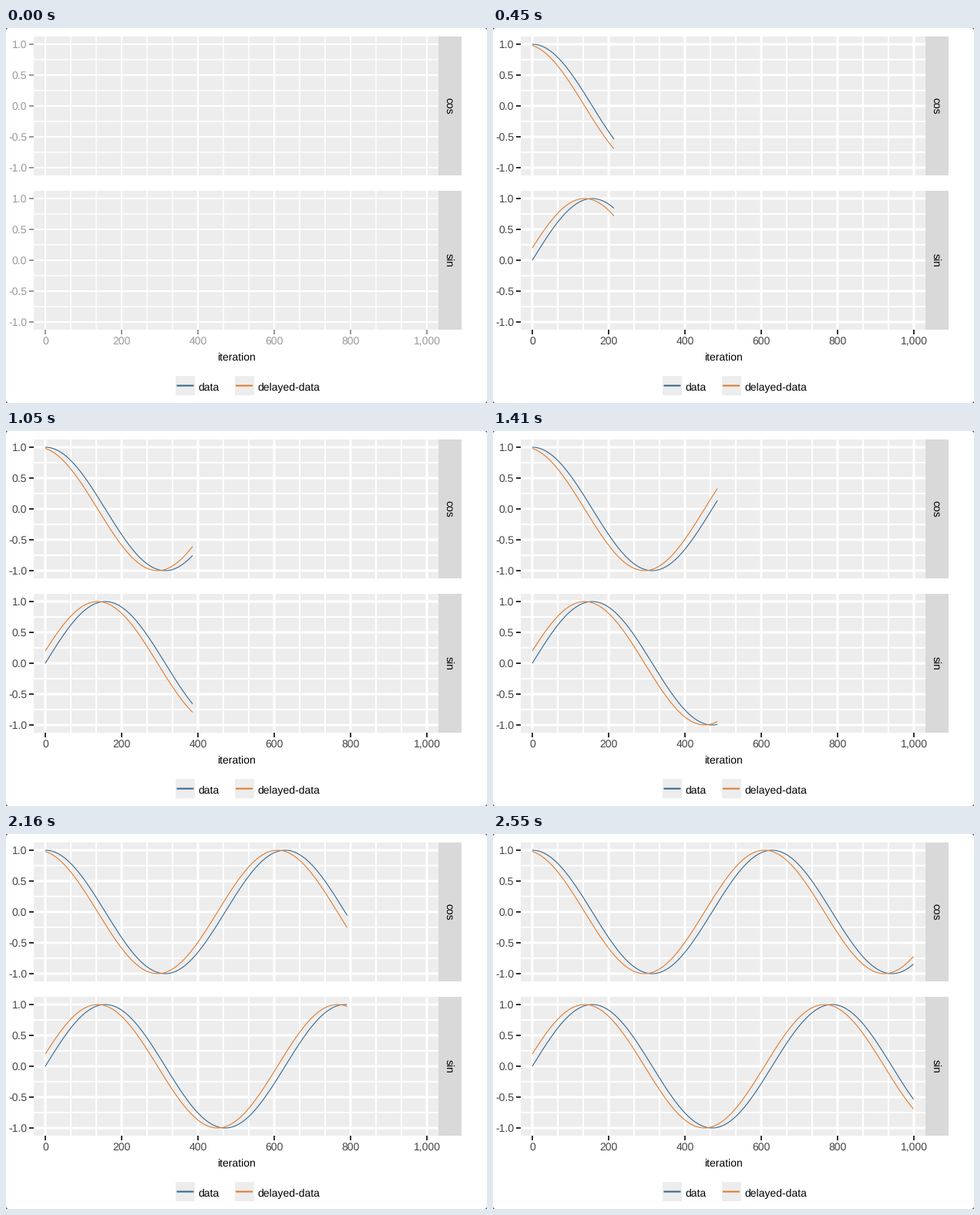
These frames come from a looping animation (624 px wide and 486 px high, 2.88 s). A matplotlib script:

```python
import matplotlib.pyplot as plt
import numpy as np
from matplotlib.animation import FuncAnimation
from matplotlib.patches import Polygon, Rectangle

plt.rcParams["font.family"] = "Liberation Sans"
plt.rcParams["text.hinting"] = "none"

W, H, DPI = 624, 486, 96
PX = 72 / DPI  # points per pixel
FRAMES, INTERVAL = 96, 30

BLUE, ORANGE = "#33658c", "#dd7a2c"
PANEL, STRIP = "#ededed", "#d9d9d9"
LEFT, RIGHT, X0, X_SCALE = 36, 561, 51, 0.495
HALF, AMP = 90, 80
PANELS = [(np.cos, "cos", 101), (np.sin, "sin", 301)]

# Iterations received so far; the stream arrives at an uneven pace.
SLOTS = [0, 6, 23, 34, 36, 54, 55, 58, 71, 73, 84]
COUNTS = [0, 146, 290, 386, 406, 549, 549, 591, 791, 810, 999]

fig = plt.figure(figsize=(W / DPI, H / DPI), dpi=DPI, facecolor="white")
ax = fig.add_axes([0, 0, 1, 1])
ax.set_xlim(0, W)
ax.set_ylim(H, 0)
ax.axis("off")


def box(x, y, w, h, color):
    ax.add_patch(Rectangle((x, y), w, h, fc=color, lw=0, zorder=1))


def line(x, y, color, width, z):
    return ax.plot(x, y, color=color, lw=width * PX, zorder=z,
                   solid_capstyle="butt", snap=False)[0]


def text(x, y, s, color="black", ha="center", va="baseline", rotation=0):
    return ax.text(x, y, s, size=14 * PX, color=color, ha=ha, va=va,
                   rotation=rotation, rotation_mode="anchor", zorder=5)


major, minor, ticks, labels, curves = [], [], [], [], []

for func, name, mid in PANELS:
    top, bottom = mid - HALF, mid + HALF
    box(LEFT, top, RIGHT - LEFT, 2 * HALF, PANEL)
    box(RIGHT, top, 30, 2 * HALF, STRIP)
    text(570.5, mid, name, rotation=270)

    for value in (-0.75, -0.25, 0.25, 0.75):
        y = mid - AMP * value
        minor.append(line([LEFT, RIGHT], [y, y], "white", 2, 2))
    for k in range(16):
        x = X0 + 33 * k
        group = minor if k % 3 else major
        group.append(line([x, x], [top, bottom], "white", 2, 2))
    for value in (1, 0.5, 0, -0.5, -1):
        y = mid - AMP * value
        major.append(line([LEFT, RIGHT], [y, y], "white", 3, 2))
        ticks.append(line([30, LEFT], [y, y], "#333333", 2, 3))
        labels.append(text(27.3, y + 5, f"{value:.1f}", ha="right"))

    for shift, color in ((0, BLUE), (20, ORANGE)):
        curves.append((func, shift, mid, line([], [], color, 1.1, 4)))

for n in range(0, 1001, 200):
    x = X0 + X_SCALE * n
    ticks.append(line([x, x], [391, 397], "#333333", 2, 3))
    labels.append(text(x + 0.3, 410, f"{n:,}"))

text(298.5, 431, "iteration")
for x, color, name in ((220, BLUE, "data"), (296.5, ORANGE, "delayed-data")):
    box(x, 451, 25, 25, PANEL)
    line([x + 1.5, x + 23.5], [463.5, 463.5], color, 2, 3)
    text(x + 29.8, 470, name, ha="left")

# Rounded window corners
for cx, dx in ((0, 2.5), (W, -2.5)):
    for cy, dy in ((0, 2.5), (H, -2.5)):
        ax.add_patch(Polygon([(cx, cy), (cx + dx, cy), (cx, cy + dy)],
                             fc="#777777", lw=0, zorder=6))


def update(frame):
    idle = frame < 2 and frame * INTERVAL < 60
    for item in major:
        item.set_linewidth((2 if idle else 3) * PX)
    for item in minor:
        item.set_linewidth((1.5 if idle else 2) * PX)
    for item in ticks:
        item.set_color("#999999" if idle else "#333333")
    for item in labels:
        item.set_color("#999999" if idle else "#444444")

    # The first picture lasts two ticks, then one step per tick.
    count = 0 if idle else np.interp(frame - 1, SLOTS, COUNTS)
    n = np.arange(int(round(count)) + 1) if count else np.array([])
    for func, shift, mid, curve in curves:
        curve.set_data(X0 + X_SCALE * n, mid - AMP * func((n + shift) / 100))
    return [c[-1] for c in curves]


anim = FuncAnimation(fig, update, frames=FRAMES, interval=INTERVAL,
                     init_func=lambda: update(0), repeat=True,
                     repeat_delay=0, blit=False)
plt.show()
```
